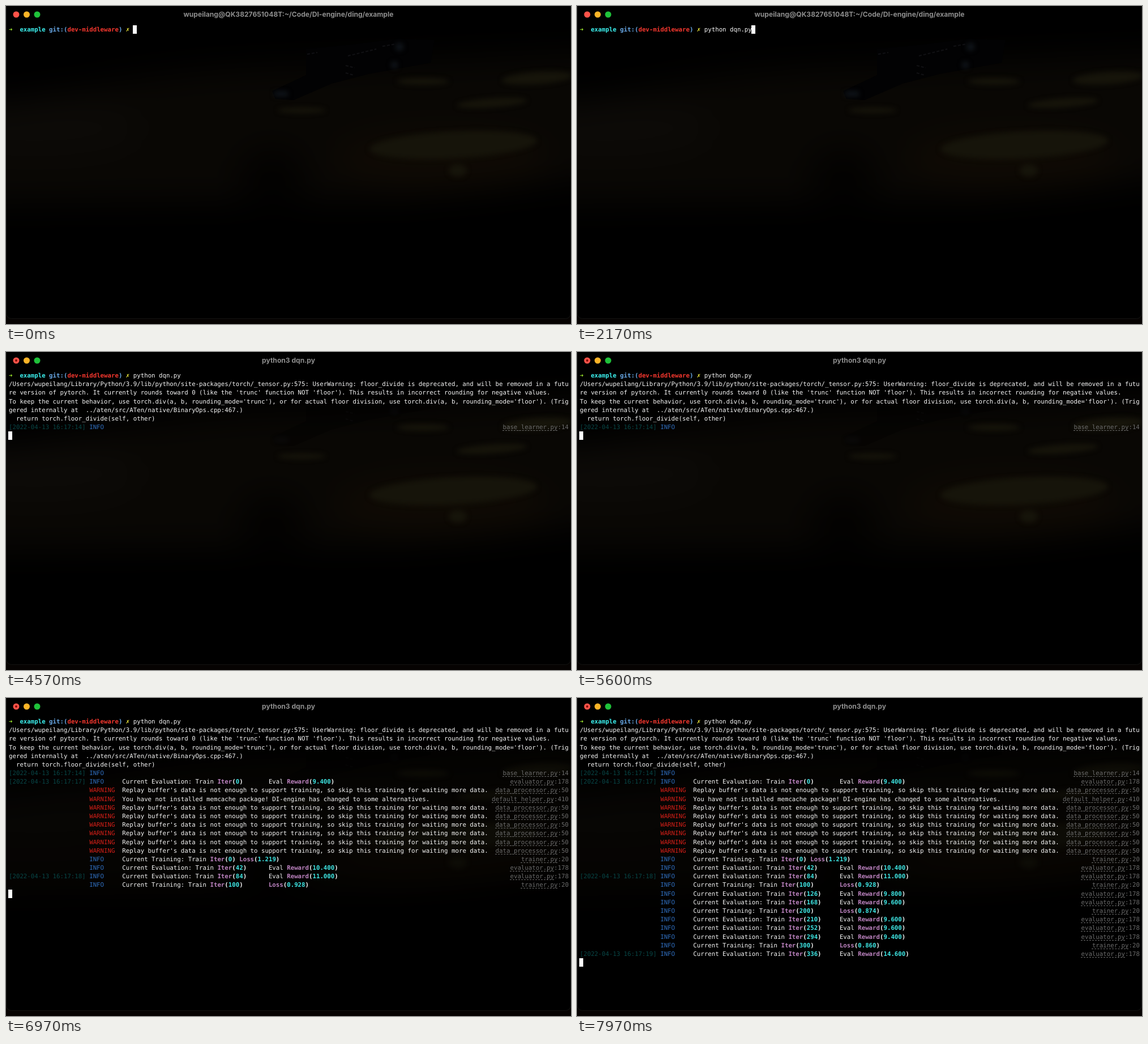
Animation of 998 by 561 pixels, one loop 8 s. Source, as an HTML page:

```html
<!DOCTYPE html>
<html lang="en">
<head>
<meta charset="utf-8">
<title>Terminal session</title>
<style>
  html, body { margin: 0; width: 100%; height: 100%; overflow: hidden; background: #060302; }
  svg { position: absolute; left: 0; top: 0; }
  #title {
    position: absolute; left: 0; top: 5px; width: 998px; text-align: center;
    font: 700 12.1px/20px Inter, sans-serif; color: #8d8d8d; white-space: pre;
  }
  #screen {
    position: absolute; left: 5px; top: 34px; color: #f6f6f6; white-space: pre;
    font: 10.74px/15px "DejaVu Sans Mono", monospace;
    text-rendering: geometricPrecision; font-variant-ligatures: none;
  }
  #screen div { position: absolute; left: 0; height: 15px; }
  #screen #cursor { width: 7px; margin-left: -.6px; background: #fff; }
  .cell { display: inline-block; width: 1ch; }
  .arrow { color: #9be62c; }
  .dir { color: #3cf0ee; }
  .git { color: #68a8e6; }
  .branch { color: #f4372e; }
  .dirty { color: #f4ef3c; }
  .stamp { color: #084747; }
  .INFO { color: #2f6dbd; }
  .WARNING { color: #d51f18; }
  .file { color: #6b6b6b; }
  .file u { text-decoration: underline dashed 1px; text-underline-offset: 2px; text-decoration-skip-ink: none; }
  .key { color: #bd83c0; }
  .num { color: #3ee6e4; }
</style>
</head>
<body>
<svg width="998" height="561" viewBox="0 0 998 561" color-interpolation-filters="sRGB">
  <defs>
    <filter id="soft" x="-50%" y="-100%" width="200%" height="300%"><feGaussianBlur stdDeviation="4"/></filter>
    <filter id="haze" x="-50%" y="-100%" width="200%" height="300%"><feGaussianBlur stdDeviation="28"/></filter>
    <clipPath id="pane"><rect y="30" width="998" height="521"/></clipPath>
  </defs>
  <rect x=".5" y="-12" width="997" height="563.5" rx="9" fill="#000" stroke="#141412"/>
  <g id="art" clip-path="url(#pane)">
    <g filter="url(#haze)">
      <path d="M-80 190Q240 110 520 105L1080 80V300L700 340L-80 350Z" fill="#090704"/>
      <ellipse cx="50" cy="215" rx="190" ry="50" fill="#0c0a07"/>
      <ellipse cx="770" cy="270" rx="190" ry="50" fill="#0f0a04"/>
      <ellipse cx="470" cy="300" rx="60" ry="50" fill="#030201"/>
    </g>
    <g filter="url(#soft)" fill="#16140a">
      <ellipse cx="790" cy="245" rx="148" ry="24" transform="rotate(-3 790 245)"/>
      <ellipse cx="858" cy="171" rx="62" ry="8" transform="rotate(-4 858 171)"/>
      <ellipse cx="938" cy="127" rx="62" ry="11" transform="rotate(-4 938 127)"/>
      <ellipse cx="736" cy="133" rx="46" ry="6"/>
      <ellipse cx="522" cy="184" rx="42" ry="5"/>
      <ellipse cx="798" cy="290" rx="16" ry="11"/>
    </g>
    <g id="ship">
      <path d="M470 150L530 122V76L610 68L690 58L757 60L750 100L640 120L575 137L508 166L476 164Z" fill="#020203"/>
      <g fill="#11161c" filter="url(#soft)">
        <circle cx="695" cy="72" r="7"/>
        <circle cx="686" cy="104" r="6"/>
        <rect x="474" y="151" width="24" height="8"/>
      </g>
      <path d="M532 85l18-3M604 88l50-12M600 105l16 4M600 118l14 4M665 71l24-4" stroke="#111114" stroke-width="2" stroke-dasharray="5 3"/>
    </g>
  </g>
  <circle cx="18" cy="15" r="5.5" fill="#ff5349"/>
  <circle cx="36.5" cy="15" r="5.5" fill="#fdb427"/>
  <circle cx="55" cy="15" r="5.5" fill="#1fc23a"/>
  <circle id="busy" cx="18" cy="15" r="1.9" fill="#790703"/>
</svg>
<div id="title"></div>
<div id="screen"><div id="cursor"></div></div>

<script>
const LOOP = 8000, PITCH = 15.18, COLUMNS = 153;
const TYPE_START = 1010, TYPE_STEP = 95, ENTER = 2420;
const PROMPT_COLUMNS = 34, COMMAND = 'python dqn.py';
const HOME_TITLE = 'wupeilang@QK3827651048T:~/Code/DI-engine/ding/example';

const byId = id => document.getElementById(id);
const screen = byId('screen'), cursor = byId('cursor'), title = byId('title');
const span = (cls, text) => `<span class="${cls}">${text}</span>`;
const rows = [];

function addRow(time, html) {
  const el = document.createElement('div');
  el.innerHTML = html;
  el.style.top = rows.length * PITCH + 'px';
  screen.append(el);
  rows.push({ time, el });
}

// Tabs advance to the next multiple of eight within the message.
const expandTabs = text => text.split('\t').reduce(
  (left, right) => left.padEnd((Math.floor(left.length / 8) + 1) * 8) + right);

const highlight = text => text.replace(/(\w+)\(([\d.]+)\)/g,
  (_, key, num) => `<b>${span('key', key)}(${span('num', num)})</b>`);

let lastSecond;
function log(time, second, level, message, file, line) {
  const stamp = second === lastSecond ? '' : `[2022-04-13 16:17:${second}]`;
  lastSecond = second;
  const text = expandTabs(message);
  const gap = ' '.repeat(COLUMNS - 31 - text.length - `${file}:${line}`.length);
  addRow(time, span('stamp', stamp.padEnd(22)) + span(level, level.padEnd(9)) +
    highlight(text) + gap + span('file', `<u>${file}</u>:${line}`));
}

const evaluation = (time, second, iter, reward) => log(time, second, 'INFO',
  `Current Evaluation: Train Iter(${iter})\tEval Reward(${reward})`, 'evaluator.py', 178);
const training = (time, second, iter, loss) => log(time, second, 'INFO',
  `Current Training: Train Iter(${iter})\tLoss(${loss})`, 'trainer.py', 20);
const iterTime = iter => 6880 + (iter - 84) * 4;

addRow(0, '<b>' + span('arrow cell', '➜') + '  ' + span('dir', 'example') + ' ' +
  span('git', 'git:(') + span('branch', 'dev-middleware') + span('git', ')') + ' ' +
  span('dirty cell', '✗') + '</b> <span id="command"></span>');
const command = byId('command');

[
  '/Users/wupeilang/Library/Python/3.9/lib/python/site-packages/torch/_tensor.py:575: UserWarning: floor_divide is deprecated, and will be removed in a futu',
  "re version of pytorch. It currently rounds toward 0 (like the 'trunc' function NOT 'floor'). This results in incorrect rounding for negative values.",
  "To keep the current behavior, use torch.div(a, b, rounding_mode='trunc'), or for actual floor division, use torch.div(a, b, rounding_mode='floor'). (Trig",
  'gered internally at  ../aten/src/ATen/native/BinaryOps.cpp:467.)',
  '  return torch.floor_divide(self, other)'
].forEach(text => addRow(3570, text));

log(3700, 14, 'INFO', '', 'base_learner.py', 14);
evaluation(6250, 17, 0, '9.400');
for (let i = 0; i < 8; i++) {
  const time = 6515 + i * 8;
  if (i === 1) log(time, 17, 'WARNING',
    'You have not installed memcache package! DI-engine has changed to some alternatives.', 'default_helper.py', 410);
  else log(time, 17, 'WARNING',
    "Replay buffer's data is not enough to support training, so skip this training for waiting more data.", 'data_processor.py', 50);
}
training(6590, 17, 0, '1.219');
evaluation(iterTime(42), 17, 42, '10.400');

const losses = { 100: '0.928', 200: '0.874', 300: '0.860' };
const rewards = { 84: '11.000', 126: '9.800', 168: '9.600', 210: '9.600', 252: '9.600', 294: '9.400', 336: '14.600' };
for (const iter of Object.keys({ ...losses, ...rewards })) {
  const second = iter < 336 ? 18 : 19;
  if (losses[iter]) training(iterTime(iter), second, iter, losses[iter]);
  else evaluation(iterTime(iter), second, iter, rewards[iter]);
}

function draw(now) {
  const t = now % LOOP;
  const running = t >= ENTER;
  const typed = Math.max(0, Math.min(COMMAND.length, Math.floor((t - TYPE_START) / TYPE_STEP) + 1));
  command.textContent = COMMAND.slice(0, typed);
  title.textContent = running ? 'python3 dqn.py' : HOME_TITLE;
  byId('busy').style.display = running ? '' : 'none';

  let shown = 0;
  for (const { time, el } of rows) {
    const visible = t >= time;
    el.style.visibility = visible ? 'visible' : 'hidden';
    shown += visible;
  }
  cursor.style.left = running ? 0 : `${PROMPT_COLUMNS + typed}ch`;
  cursor.style.top = (running ? shown : 0) * PITCH + 'px';
  byId('ship').style.opacity = shown > 1 ? 0.3 : 1;
  byId('art').style.opacity = shown > 8 ? 0.6 : 1;
  requestAnimationFrame(draw);
}
requestAnimationFrame(draw);
</script>
</body>
</html>
```
